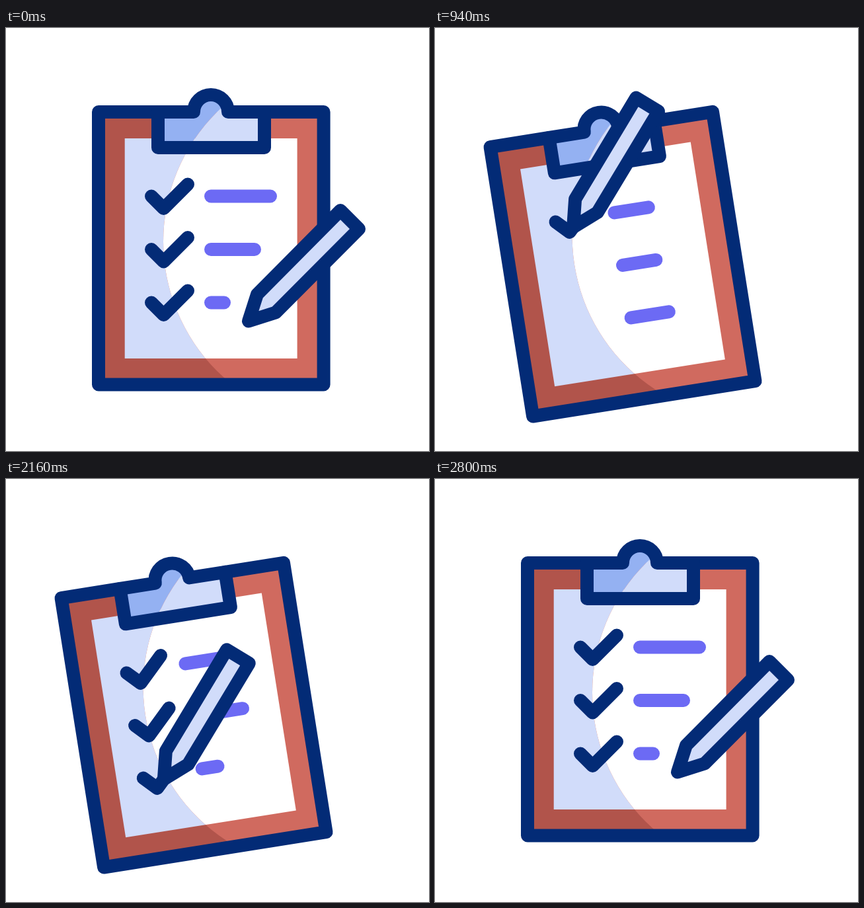
An HTML page with a canvas that plays this animation: 640 by 640 pixels, repeating every 3000 ms.

```html
<!DOCTYPE html>
<html lang="en">
<head>
<meta charset="utf-8">
<title>Checklist</title>
<style>
  html, body { margin: 0; height: 100%; overflow: hidden; background: #fff; }
  canvas { display: block; width: 100vw; height: 100vh; }
</style>
</head>
<body>
<canvas id="stage" width="640" height="640"></canvas>
<script>
const ctx = document.getElementById('stage').getContext('2d');
const LOOP = 3000, TILT = -9, LEAN = -13.8;
const NAVY = '#032b76', PALE = '#d1dcfa', VIOLET = '#6c6af4';
const PIVOT = [449, 512], HOME = [367, 443.5];
const CHECK = [[220, 254.5], [238.5, 273], [275, 236.5]];
const BEND = 0.336; // share of the check's length before its corner
const ROW = 80.5;

// Bar lengths at 600, 1200, 1800 and 2400 ms
const BARS = [[90, 27, 52, 90], [66, 41, 91.5, 66], [20, 83, 32, 20]];

// The board outline stays open where the clip sits
const board = new Path2D('M230 127H140V539.5H480.6V127H391');
const clipPath = new Path2D('M230 127H284A26 26 0 0 1 336 127H391V181H230Z');
const pencil = new Path2D('M0 0L13 -40.5L139 -167.5L167 -139.5L41 -13Z');
const lightArea = new Path2D();
lightArea.arc(515, 323, 277, 0, Math.PI * 2);

const rad = deg => deg * Math.PI / 180;
const mix = (a, b, k) => a + (b - a) * k;
const mixPoint = (p, q, k) => [mix(p[0], q[0], k), mix(p[1], q[1], k)];

function ease(t, from, to) {
  const k = Math.min(1, Math.max(0, (t - from) / (to - from)));
  return k * k * (3 - 2 * k);
}

function checkPoint(row, k) {
  const [start, bend, end] = CHECK;
  const [x, y] = k < BEND
    ? mixPoint(start, bend, k / BEND)
    : mixPoint(bend, end, (k - BEND) / (1 - BEND));
  return [x, y + row * ROW];
}

// Place of a check point on the stage while the board is fully tilted
function tiltedPoint(row, k) {
  const [x, y] = checkPoint(row, k);
  const dx = x - PIVOT[0], dy = y - PIVOT[1];
  const c = Math.cos(rad(TILT)), s = Math.sin(rad(TILT));
  return [PIVOT[0] + dx * c - dy * s, PIVOT[1] + dx * s + dy * c];
}

function pencilTip(t) {
  if (t < 800) return mixPoint(HOME, tiltedPoint(0, 0), ease(t, 200, 800));
  if (t >= 2300) return mixPoint(tiltedPoint(2, 1), HOME, ease(t, 2300, 2800));
  const row = Math.floor((t - 800) / 600);
  const start = 800 + row * 600;
  if (t < start + 300) return tiltedPoint(row, ease(t, start, start + 300));
  return mixPoint(tiltedPoint(row, 1), tiltedPoint(row + 1, 0), ease(t, start + 300, start + 600));
}

function strokeLine(points, color) {
  ctx.strokeStyle = color;
  ctx.beginPath();
  points.forEach(p => ctx.lineTo(...p));
  ctx.stroke();
}

function fillBoard(frame, paper, clip) {
  ctx.fillStyle = frame;
  ctx.fill(board);
  ctx.fillStyle = paper;
  ctx.fillRect(179.7, 167, 260.9, 333);
  ctx.fillStyle = clip;
  ctx.fill(clipPath);
}

function drawBoard() {
  fillBoard('#b1544b', PALE, '#94b1f2');
  ctx.save();
  ctx.clip(lightArea);
  fillBoard('#d06a5f', '#fff', PALE);
  ctx.restore();
  ctx.strokeStyle = NAVY;
  ctx.stroke(board);
  ctx.stroke(clipPath);
}

function drawCheck(t, row) {
  const drawStart = 800 + row * 600, wipeStart = 200 + row * 100;
  const drawing = t >= drawStart;
  const from = drawing ? 0 : ease(t, wipeStart, wipeStart + 400);
  const to = drawing ? ease(t, drawStart, drawStart + 300) : 1;
  if (from >= to) return;
  const points = [checkPoint(row, from)];
  if (from < BEND && to > BEND) points.push(checkPoint(row, BEND));
  points.push(checkPoint(row, to));
  strokeLine(points, NAVY);
}

function drawBar(t, row) {
  const step = Math.min(2, Math.max(0, Math.floor((t - 600) / 600)));
  const start = 600 + step * 600;
  const length = mix(BARS[row][step], BARS[row][step + 1], ease(t, start, start + 600));
  const y = 254.5 + row * ROW;
  strokeLine([[310, y], [310 + length, y]], VIOLET);
}

function drawPencil(t) {
  ctx.save();
  ctx.translate(...pencilTip(t));
  ctx.rotate(rad(LEAN) * (ease(t, 200, 800) - ease(t, 2300, 2800)));
  ctx.fillStyle = PALE;
  ctx.strokeStyle = NAVY;
  ctx.fill(pencil);
  ctx.stroke(pencil);
  ctx.restore();
}

function draw(t) {
  ctx.fillStyle = '#fff';
  ctx.fillRect(0, 0, 640, 640);
  ctx.lineWidth = 20;
  ctx.lineCap = ctx.lineJoin = 'round';

  ctx.save();
  ctx.translate(...PIVOT);
  ctx.rotate(rad(TILT) * (ease(t, 200, 600) - ease(t, 2300, 2700)));
  ctx.translate(-PIVOT[0], -PIVOT[1]);
  drawBoard();
  for (let row = 0; row < 3; row++) {
    drawCheck(t, row);
    drawBar(t, row);
  }
  ctx.restore();
  drawPencil(t);
}

const begin = performance.now();
function tick() {
  draw((performance.now() - begin) % LOOP);
  requestAnimationFrame(tick);
}
tick();
</script>
</body>
</html>
```
